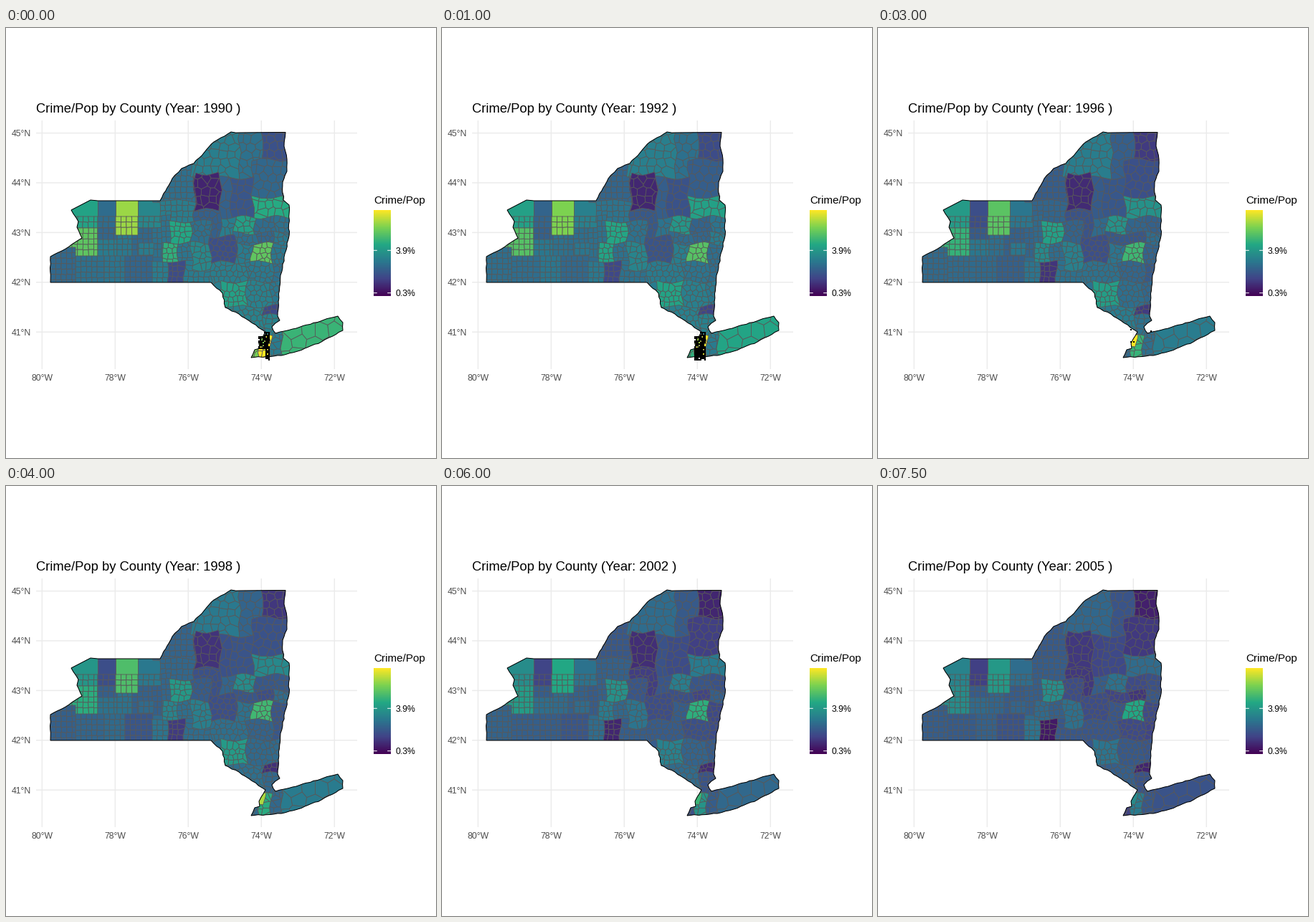
A matplotlib script for the animation above (8000 ms loop, 600x600 px).

```python
import numpy as np
import matplotlib.pyplot as plt
from matplotlib.animation import FuncAnimation
from matplotlib.collections import PolyCollection
from matplotlib.colors import LinearSegmentedColormap
from matplotlib.patches import PathPatch, Polygon
from matplotlib.path import Path

plt.rcParams["font.family"] = "Liberation Sans"
PX = 0.72  # points per pixel at 100 dpi
YEARS = np.arange(1990, 2006)

rng = np.random.default_rng(7)
# Six viridis stops with straight blends between them.
cmap = LinearSegmentedColormap.from_list(
    "stops", plt.get_cmap("viridis")(np.linspace(0, 1, 6)))

fig = plt.figure(figsize=(6, 6), dpi=100, facecolor="white")
ax = fig.add_axes([0, 0, 1, 1])
ax.axis("off")


def label(x, y, s, size, color="black", ha="left"):
    return ax.text(x, y, s, fontsize=size, color=color, ha=ha, va="baseline")


def rule(xs, ys, **style):
    ax.plot(xs, ys, snap=False, solid_capstyle="butt", **style)


def rough(*flat, step=5, amp=0.8):
    """Subdivide a coast line and shake the new points a little."""
    pts = np.array(flat, float).reshape(-1, 2)
    out = []
    for a, b in zip(pts, pts[1:]):
        n = max(1, int(np.hypot(*(b - a)) / step))
        for k in range(n):
            out.append(a + (b - a) * k / n + (rng.uniform(-amp, amp, 2) if k else 0))
    return out + [pts[-1]]


def cut(poly, normal, limit):
    """Keep the part of a polygon where normal . p <= limit."""
    out = []
    for a, b in zip(poly, np.roll(poly, -1, axis=0)):
        da, db = a @ normal - limit, b @ normal - limit
        if da <= 0:
            out.append(a)
        if da * db < 0:
            out.append(a + (b - a) * da / (da - db))
    return np.array(out).reshape(-1, 2)


def eastness(x):
    return np.clip((x - 200) / 60, 0, 1)


def warped_box(x0, y0, x1, y1):
    """A box, straight in the west and with bent borders further east."""
    k = np.linspace(0, 1, 5)[:-1]
    w, h = x1 - x0, y1 - y0
    x = np.concatenate([x0 + w * k, x1 + 0 * k, x1 - w * k, x0 + 0 * k])
    y = np.concatenate([y0 + 0 * k, y0 + h * k, y1 + 0 * k, y1 - h * k])
    amp = 2.5 * eastness(x)
    return np.column_stack([x + amp * np.sin(y / 7 + x / 23),
                            y + amp * np.sin(x / 8 + y / 19)])


def towns(poly, size, wobble):
    """Split a county into cells around a shaken brick grid."""
    (x0, y0), (x1, y1) = poly.min(0), poly.max(0)
    path, seeds = Path(poly), []
    for row, y in enumerate(np.arange(y0 + size / 2, y1, size)):
        shift = row % 2 * size * wobble
        for x in np.arange(x0 + size / 2 - shift, x1 + size, size):
            p = np.array([x, y]) + rng.uniform(-1, 1, 2) * size * wobble
            if path.contains_point(p):
                seeds.append(p)
    cells = []
    for s in seeds:
        cell = poly
        for o in seeds:
            if o is not s and len(cell) and np.hypot(*(o - s)) < 4 * size:
                cell = cut(cell, o - s, (o @ o - s @ s) / 2)
        if len(cell) > 2:
            cells.append(cell)
    return cells or [poly]


# Panel grid and axis labels
for i in range(5):
    x, y = 50.3 + 102 * i, 146.6 + 69.4 * i
    rule([x, x], [129, 476], color="#ebebeb", lw=1.07, zorder=0)
    rule([42, 490], [y, y], color="#ebebeb", lw=1.07, zorder=0)
    label(x, 492.3, f"{80 - 2 * i}°W", 8.8, "#4d4d4d", "center")
    label(35.3, y + 4.5, f"{45 - i}°N", 8.8, "#4d4d4d", "right")

# State outline, clockwise from the south-west corner
west = rough(62, 355, 62, 319, 88, 305, 106, 293, 99, 278, 101, 270, 91, 254, amp=0.5)
lake = rough(91, 254, 118, 240, 128, 241, 215, 241, step=99)
river = rough(215, 241, 232, 210, 245, 196, 262, 189, 290, 159, 314, 145, 326, 146)
east = rough(326, 146, 390, 145.5, step=99) + rough(
    390, 145.5, 388, 165, 392, 183, 392, 200, 386, 215, 387, 240, 395, 247, 395, 290,
    383, 345, 379, 402, 382, 408, 371, 417, 376, 426)
island = rough(376, 426, 400, 420, 463, 402, 470, 411, 470, 422, 440, 438, 407, 451,
               384, 457, 342, 460, 347, 449, 354, 447, 353, 440, 362, 424, amp=0.6)
south = rough(362, 424, 325, 399, 306, 390, 302, 370, 286, 355)
outline = np.array(west + lake + river + east + island + south)

state = PathPatch(Path(outline), fc=cmap(0.35), ec="none", zorder=1)
ax.add_patch(state)
ax.add_patch(Polygon(outline, fill=False, ec="black", lw=PX, zorder=90))

# Counties that stand out: a point inside, then rates in 1990, 1996 and 2005
NOTABLE = {
    (112, 300): (74, 66, 49), (110, 260): (58, 55, 46), (140, 250): (36, 25, 19),
    (168, 270): (84, 73, 53), (245, 285): (60, 56, 48), (230, 315): (63, 48, 36),
    (280, 228): (11, 15, 15), (330, 230): (26, 26, 21), (365, 250): (62, 51, 36),
    (335, 275): (55, 50, 38), (358, 312): (75, 66, 61), (318, 375): (58, 57, 38),
    (370, 395): (22, 15, 12), (237, 342): (22, 17, 9), (300, 180): (43, 40, 32),
    (303, 308): (24, 25, 22), (430, 425): (66, 44, 28), (365, 445): (110, 66, 43),
    (357, 438): (80, 100, 47), (347, 455): (78, 36, 20),
}
counties = []


def rates(x0, y0, x1, y1):
    for (x, y), values in NOTABLE.items():
        if x0 < x < x1 and y0 < y < y1:
            break
    else:
        # Higher in the south, falling faster in the east
        start = 37 + 0.05 * ((y0 + y1) / 2 - 270) + rng.normal(0, 3)
        drop = 2 + 0.045 * ((x0 + x1) / 2 - 60) + rng.normal(0, 2)
        values = start, start - 0.4 * drop, start - drop
    path = np.interp(YEARS, (1990, 1996, 2005), values)
    return (path + rng.normal(0, 1.2, len(YEARS))) / 100


def band(y0, y1, *xs, size=None, shore=None):
    """A row of counties between the given x borders; later rows lie on top."""
    for x0, x1 in zip(xs, xs[1:]):
        poly, e = warped_box(x0, y0, x1, y1), eastness(x0)
        s = size or 7.6 + 3.5 * e * np.clip((270 - y0) / 60, 0, 1)
        wobble = 0.05 + 0.22 * e
        if shore:
            water = cut(poly, np.array([0, 1.0]), shore)
            land = cut(poly, np.array([0, -1.0]), -shore)
            cells = [water] + towns(land, s, wobble)
        else:
            cells = towns(poly, s, wobble)
        art = PolyCollection(cells, edgecolors="#595959", linewidths=0.6,
                             zorder=2 + len(counties) / 2)
        ax.add_collection(art)
        art.set_clip_path(state)
        counties.append((art, rates(x0, y0, x1, y1)))


# West
band(238, 279, 62, 128, 153, 184, 217, shore=263)
band(279, 320, 62, 128, 155, 176, 204, 219)
band(279, 295, 128, 155)
band(238, 289, 153, 184, shore=263)
band(318, 356, 97, 137, 166, 205)
band(306, 356, 62, 97)
band(300, 317, 185, 206)
# North
band(185, 243, 205, 263)
band(140, 209, 258, 326, 358, 398)
band(209, 266, 263, 299, 314, 345, 398)
band(184, 236, 344, 398)
band(241, 270, 215, 263)
band(248, 292, 263, 300)
band(203, 254, 264, 299)
# Centre
band(262, 318, 217, 230)
band(264, 291, 299, 319, 348, 376, 398)
band(286, 303, 319, 350, 372, 398)
band(270, 300, 229, 258, 285)
band(300, 328, 219, 240, 260)
band(326, 358, 204, 226, 249, 290)
band(300, 337, 259, 287)
band(291, 327, 285, 321)
band(301, 328, 321, 343, 372, 398)
# Hudson valley, city and island
band(327, 366, 287, 336, 372, 398)
band(354, 392, 298, 336, 370, 398)
band(389, 422, 298, 360)
band(400, 430, 360, 398)
band(388, 401, 358, 384)
band(395, 464, 385, 480, size=19)
band(426, 464, 370, 385)
band(430, 464, 338, 354, 370)
band(430, 446, 352, 360, size=20)


def specks(points):
    square = np.array([[0, 0], [2, 0], [2, 2], [0, 2]])
    art = PolyCollection([square + p for p in points], fc="black", ec="none", zorder=95)
    ax.add_collection(art)
    return art


# Tangled borough borders, dense until 1993, a few crumbs until 1997
cells = [(352 + 2 * c, 424 + 2 * r) for r in range(20) for c in range(8)
         if rng.random() < 0.87 and (r > 2 or c > 3)]
early = specks([p for p in cells if p[1] < 448 or p[0] >= 361])
tangle = specks(cells)
late = specks([(352, 437), (356, 437), (352, 420), (380, 422)])

# Legend
label(513, 245, "Crime/Pop", 11)
ax.imshow(np.linspace(1, 0, 300)[:, None], cmap=cmap, aspect="auto",
          extent=(513, 537, 374, 254), interpolation="nearest", zorder=5)
for y, s in ((310.3, "3.9%"), (369.7, "0.3%")):
    for x in (513, 532.2):
        rule([x, x + 4.8], [y, y], color="white", lw=PX, zorder=6)
    label(543.5, y + 4.7, s, 8.8)

title = label(42, 118, "", 13.2)
ax.set(xlim=(0, 600), ylim=(600, 0))


def draw(i):
    title.set_text(f"Crime/Pop by County (Year: {YEARS[i]} )")
    for art, values in counties:
        art.set_facecolor(cmap(float(np.clip(values[i], 0, 1))))
    early.set_visible(i == 0)
    tangle.set_visible(0 < i < 4)
    late.set_visible(4 <= i < 8)
    return []


anim = FuncAnimation(fig, draw, frames=len(YEARS), interval=500, repeat=True,
                     repeat_delay=0, blit=False)
plt.show()
```
